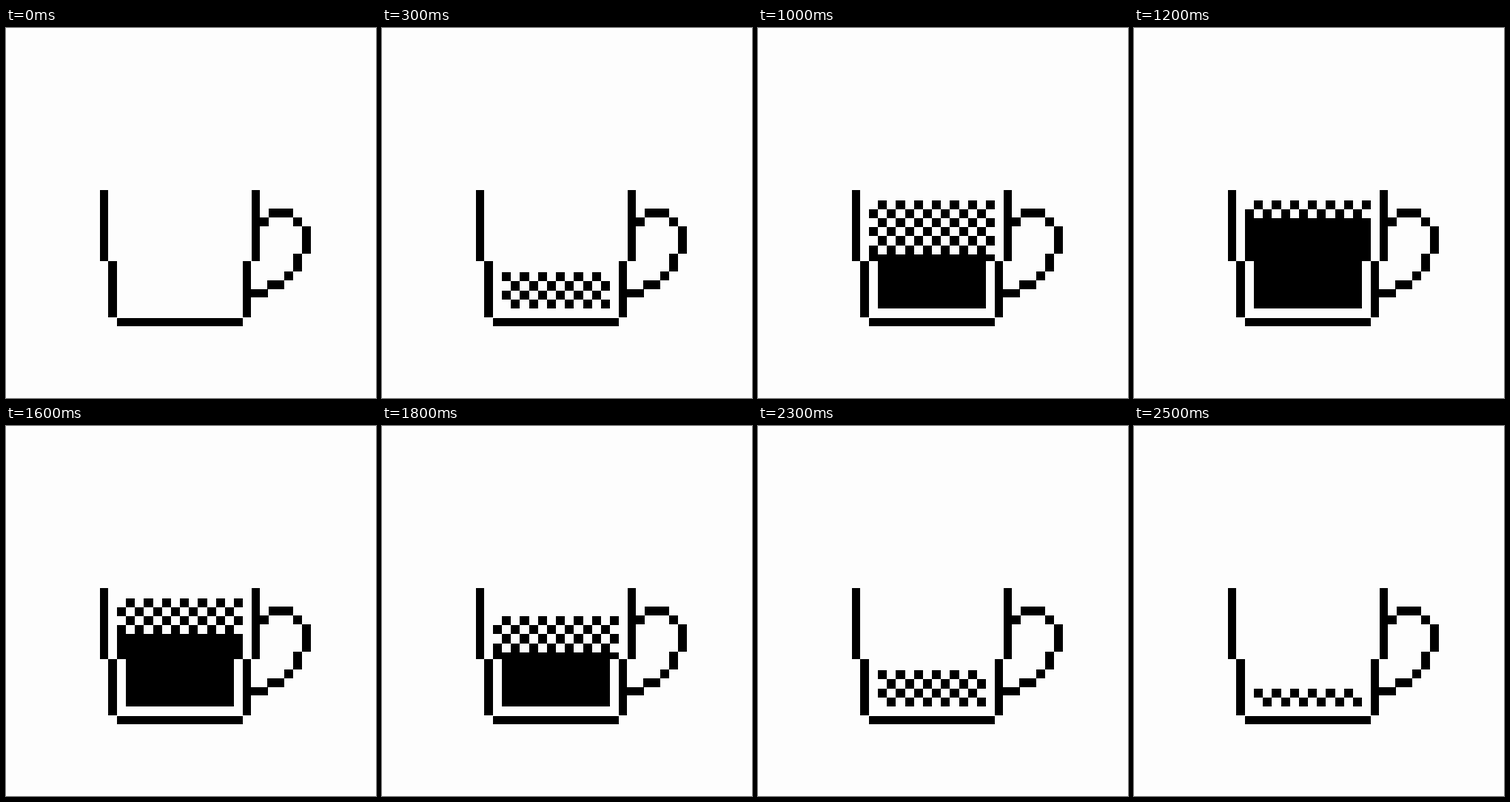
An HTML page that plays this animation: 500 px wide and 500 px high, repeating every 2.7 s.

```html
<!DOCTYPE html>
<html lang="en">
<head>
<meta charset="utf-8">
<title>Filling cup</title>
<style>
  html, body { margin: 0; width: 100%; height: 100%; overflow: hidden; background: #fdfdfd; }
  svg { display: block; width: 100vw; height: 100vh; shape-rendering: crispEdges; }

  /* The cup fills in six layers, each 24.4 high; foam runs ahead of the coffee. */
  .air { fill: #fdfdfd; animation: foam 2.7s step-end infinite; }
  .coffee { animation: coffee 2.7s step-end infinite; }

  @keyframes foam {
    0%, 100% { height: 150px; }
    3.703%, 92.592% { height: 124.6px; }
    11.111%, 85.185% { height: 100.2px; }
    18.518%, 81.481% { height: 75.8px; }
    22.222%, 74.074% { height: 51.4px; }
    29.629%, 66.666% { height: 27px; }
    37.037% { height: 0; }
  }
  @keyframes coffee {
    0%, 85.185%, 100% { y: 380px; }
    18.518%, 77.777% { y: 354.6px; }
    25.925%, 70.37% { y: 330.2px; }
    33.333%, 62.962% { y: 305.8px; }
    40.74%, 59.259% { y: 281.4px; }
    44.444% { y: 257px; }
  }
</style>
</head>
<body>
<svg viewBox="0 0 500 500">
  <clipPath id="inside">
    <path d="M150 230H320V315H308V379H162V315H150Z"/>
  </clipPath>

  <g clip-path="url(#inside)">
    <g fill="none" stroke="#000" stroke-width="12.2" stroke-dasharray="12.15">
      <path d="M162.15 238.7h170m-170 24.4h170m-170 24.4h170m-170 24.4h170m-170 24.4h170m-170 24.4h170"/>
      <path d="M150 250.9h170m-170 24.4h170m-170 24.4h170m-170 24.4h170m-170 24.4h170m-170 24.4h170"/>
    </g>
    <rect class="air" x="140" y="230" width="190" height="150"/>
    <rect class="coffee" x="140" y="380" width="190" height="150"/>
  </g>

  <!-- walls and base -->
  <path d="M127 219h11v96h-11zM138 315h12v76h-12zM150 391.6h170v11.4h-170zM320 315h11v76h-11zM332 219h11v96h-11z"/>
  <!-- handle -->
  <path d="M343 256h12v12h-12zM355 244h33v12h-33zM388 256h12v12h-12zM400 268h12v37h-12zM388 305h12v24h-12zM376 329h12v12h-12zM353 341h23v12h-23zM331 353h23v11h-23z"/>
</svg>
</body>
</html>
```
